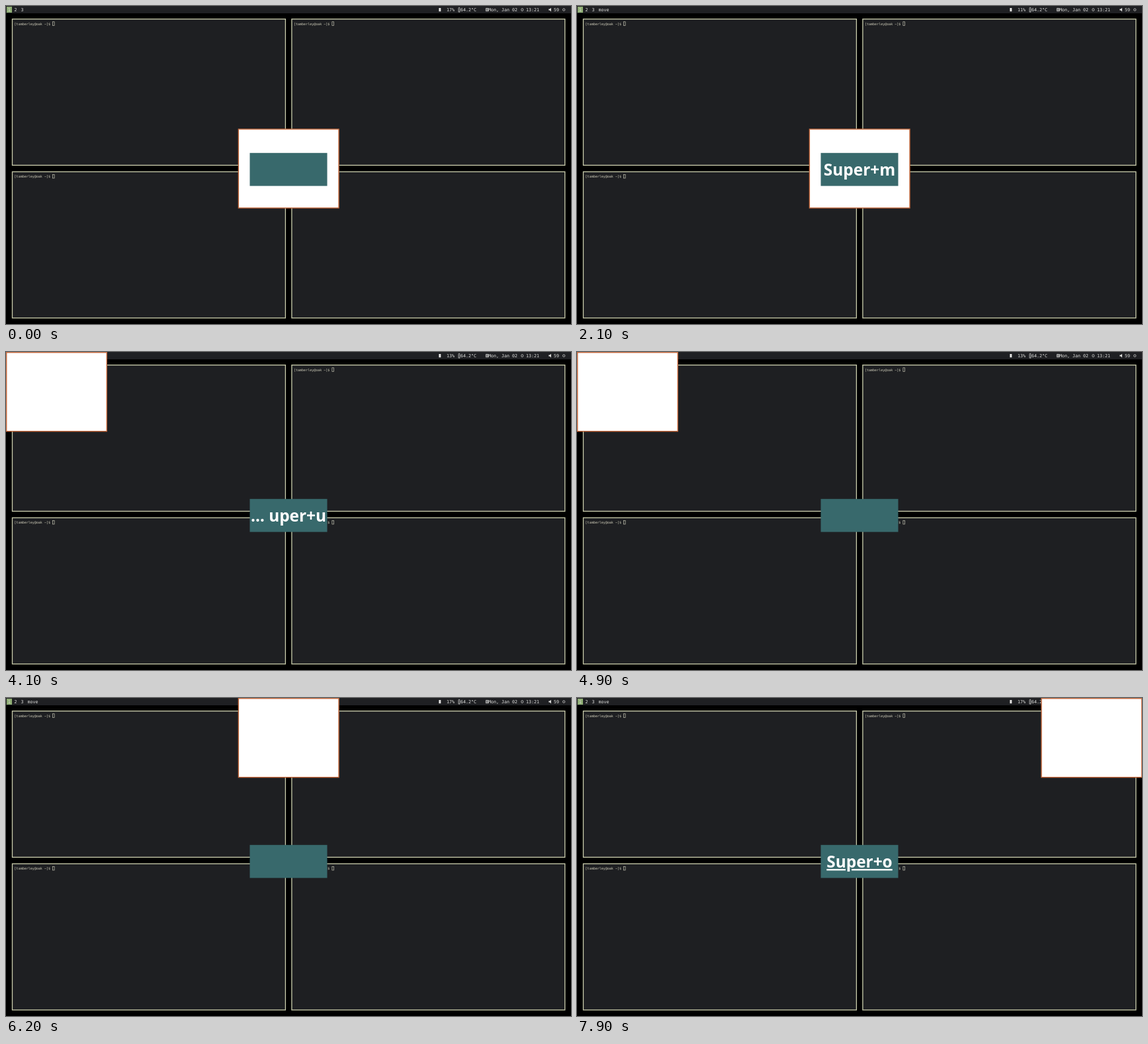
An HTML page for the animation above (8000 ms loop, 854 px wide and 480 px high).

```html
<!DOCTYPE html>
<html lang="en">
<head>
<meta charset="utf-8">
<title>Tiling desktop</title>
<style>
html, body { margin: 0; width: 100%; height: 100%; overflow: hidden; background: #000; }
svg { display: block; width: 100vw; height: 100vh; }
text { white-space: pre; }
.bar { font: 6.64px "DejaVu Sans Mono", monospace; fill: #e2e2e0; }
.prompt { font: 5.03px "DejaVu Sans Mono", monospace; fill: #d2d0bc; }
.keys { font: bold 24.4px "Noto Sans", "Open Sans", sans-serif; fill: #fff; text-anchor: middle; }
.line { text-decoration: underline; text-decoration-skip-ink: none; }
.icon { fill: none; stroke: #d0d0ce; stroke-width: .8; }
</style>
</head>
<body>
<svg viewBox="0 0 854 480">
  <rect width="854" height="480" fill="#000"/>
  <rect width="854" height="11" fill="#1f2023"/>
  <g class="bar">
    <rect x="1" y="1" width="8" height="9" fill="#8fae74"/>
    <text x="2.8" y="8">1</text>
    <text x="12.6" y="8">2</text>
    <text x="22.6" y="8">3</text>
    <text id="mode" x="32.5" y="8">move</text>
    <rect x="654.3" y="3" width="3" height="5.2"/>
    <text id="load" x="666" y="8"></text>
    <path class="icon" d="M684 9V3.2a1 1 0 0 1 2 0V9z"/>
    <text x="687" y="8">64.2°C</text>
    <path class="icon" d="M725.4 3.4h3.2v4.4h-3.2zM725.4 4.8h3.2M725.4 6.3h3.2"/>
    <text x="729" y="8">Mon, Jan 02</text>
    <ellipse class="icon" cx="780.3" cy="5.6" rx="1.5" ry="2"/>
    <text x="786" y="8">13:21</text>
    <path d="M820.3 4.6h1.6l2-1.8v5.6l-2-1.8h-1.6z"/>
    <text x="828" y="8">59</text>
    <circle class="icon" cx="843.2" cy="5.6" r="1.7"/>
  </g>
  <g id="terms"></g>
  <rect id="win" x=".7" y=".7" width="151.6" height="119" fill="#fff" stroke="#c4683c" stroke-width="1.4"/>
  <rect x="368.5" y="221.8" width="117" height="49.8" fill="#38696c"/>
  <text class="keys" x="427" y="256"><tspan id="lead"></tspan><tspan id="combo"></tspan></text>
</svg>
<script>
const LOOP = 8000;
const $ = id => document.getElementById(id);

// Each row: start time in ms, value
const winAt = [[0, [350.7, 185.2]], [3200, [0, 0]], [5200, [350.7, 0]], [7900, [701.3, 0]]];
const loadAt = [[0, 17], [2000, 11], [4100, 13], [6100, 17]];
const modeAt = [[0, "hidden"], [1900, "visible"]];
// Key display: [leading text, key combination, underlined]
const keysAt = [
  [0, ["", "", false]],
  [1900, ["", "Super+m", true]],
  [2100, ["", "Super+m", false]],
  [3200, ["… ", "uper+u", true]],
  [3400, ["… ", "uper+u", false]],
  [4200, ["", "", false]],
  [5200, ["", "Super+i", true]],
  [5400, ["", "Super+i", false]],
  [6100, ["", "", false]],
  [7900, ["", "Super+o", true]]
];

const pick = (steps, t) => steps.filter(s => s[0] <= t).pop()[1];

const term = (x, y) => `
  <rect x="${x}" y="${y}" width="412.9" height="220.7" fill="#1e1f22" stroke="#cccfae" stroke-width="1.3"/>
  <text class="prompt" x="${x + 3.1}" y="${y + 8.9}">[tamberley@oak ~]$</text>
  <rect x="${x + 61}" y="${y + 4.1}" width="2.6" height="5.6" fill="none" stroke="#c4c3b2" stroke-width=".7"/>`;
$("terms").innerHTML = [[9.5, 19.7], [431.9, 19.7], [9.5, 250.2], [431.9, 250.2]]
  .map(p => term(...p)).join("");

function draw(t) {
  $("win").setAttribute("transform", `translate(${pick(winAt, t)})`);
  $("load").textContent = pick(loadAt, t) + "%";
  $("mode").setAttribute("visibility", pick(modeAt, t));
  const [lead, combo, line] = pick(keysAt, t);
  $("lead").textContent = lead;
  $("combo").textContent = combo;
  $("combo").setAttribute("class", line ? "line" : "");
}

const start = performance.now();
function tick() {
  draw((performance.now() - start) % LOOP);
  requestAnimationFrame(tick);
}
tick();
</script>
</body>
</html>
```
